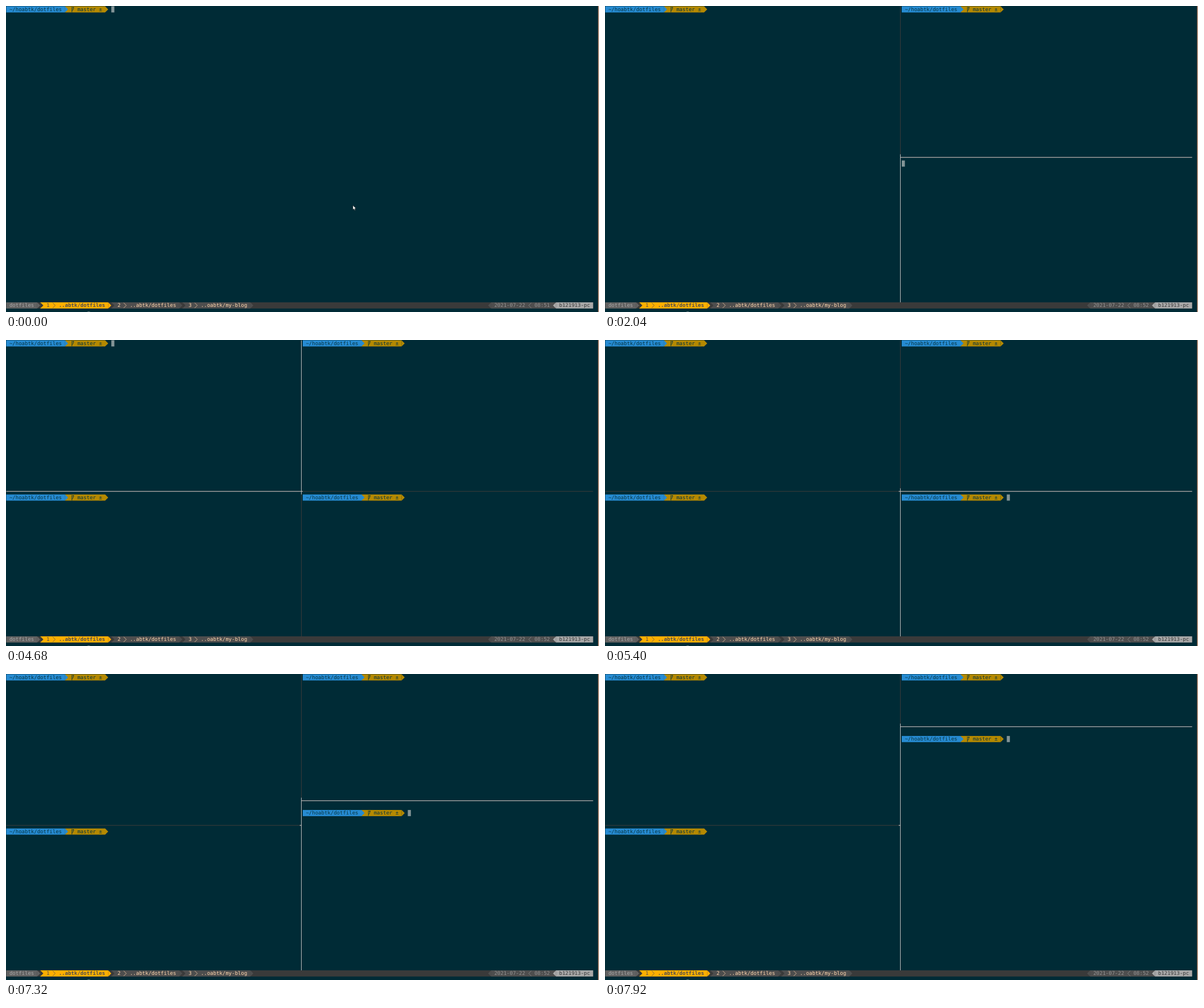
Animation, 1041 px wide and 538 px high, one loop 8000 ms. Source, as an HTML page:

```html
<!DOCTYPE html>
<html lang="en">
<head>
<meta charset="utf-8">
<title>Terminal panes</title>
<style>
  html, body { margin: 0; width: 100%; height: 100%; overflow: hidden; background: #002b36; }
  svg { display: block; width: 1041px; height: 538px; }
  text {
    font: 9px "DejaVu Sans Mono", monospace;
    white-space: pre;
    text-rendering: geometricPrecision;
  }
  .bold { font-weight: bold; }
</style>
</head>
<body>
<svg id="stage" viewBox="0 0 1041 538">
  <defs><clipPath id="near"><rect id="nearBox"/></clipPath></defs>
  <rect width="1041" height="538" fill="#002b36"/>
  <rect x="1039.5" width=".7" height="538" fill="#d9713f"/>
  <rect x="1040.2" width=".8" height="538" fill="#f8d9c8"/>
  <path d="M142.5 538.2q2.7-1.6 5.4 0" fill="none" stroke="#8a9696" stroke-width=".8"/>
  <g id="panes"></g>
  <g id="status"></g>
  <path id="mouse" d="M609 350.6v7.6l1.8-1.6 1.2 2.6 1.3-.6-1.2-2.5h2.3z"
        fill="#fff" stroke="#000" stroke-width=".5"/>
</svg>
<script>
const LOOP = 8000, COLS = 190, ROWS = 48, MID = 95, HALF = 24;
const CW = 1041 / 192, CH = 2 * CW;
const USER = "hoabtk";
const px = col => 0.5 + col * CW;
const py = row => 0.5 + row * CH;
const $ = id => document.getElementById(id);

function add(parent, tag, attrs) {
  const el = document.createElementNS("http://www.w3.org/2000/svg", tag);
  for (const key in attrs) el.setAttribute(key, attrs[key]);
  return parent.appendChild(el);
}

function fill(parent, col, row, cols, color) {
  add(parent, "rect", { x: px(col), y: py(row), width: cols * CW, height: CH, fill: color });
}

function write(parent, col, row, string, color, cls = "") {
  const el = add(parent, "text", { x: px(col), y: py(row) + 8.4, fill: color, class: cls });
  el.textContent = string;
  return el;
}

// Powerline separators: dir 1 points right, -1 points left.
function arrow(parent, col, row, color, dir = 1, thin = false) {
  const x = px(dir > 0 ? col : col + 1), y = py(row);
  const inset = thin ? 0.8 : 0;
  add(parent, "path", {
    d: `M${x} ${y + inset}l${dir * (CW - inset)} ${CH / 2 - inset}l${-dir * (CW - inset)} ${CH / 2 - inset}`,
    fill: thin ? "none" : color,
    stroke: thin ? color : "none",
    "stroke-width": 0.7
  });
}

function prompt(parent, col, row) {
  const ink = "#073642", blue = "#268bd2", gold = "#b58900";
  fill(parent, col + 19, row, 13, gold);
  fill(parent, col, row, 19, blue);
  arrow(parent, col + 19, row, blue);
  arrow(parent, col + 32, row, gold);
  write(parent, col + 1, row, `~/${USER}/dotfiles`, ink);
  write(parent, col + 23, row, "master ±", ink);
  add(parent, "path", {
    d: `M${px(col + 21) + 1.4} ${py(row) + 1}v9.4m0-2.6q2.4-1 2.4-3.4v-3m-1.2 1.6l1.2-1.6 1.2 1.6`,
    fill: "none", stroke: ink, "stroke-width": 0.9
  });
}

function drawStatus() {
  const g = $("status"), row = ROWS;
  const bar = "#3a3a3a", mid = "#4e4e4e", grey = "#626262", pale = "#a8a8a8", dim = "#949494";
  fill(g, 0, row, COLS, bar);

  fill(g, 0, row, 10, grey);
  write(g, 1, row, "dotfiles", pale);
  arrow(g, 10, row, grey);

  const tab = (col, index, name, back, ink, cls) => {
    fill(g, col, row, 22, back);
    arrow(g, col, row, bar);
    write(g, col + 2, row, index, ink);
    arrow(g, col + 4, row, ink, 1, true);
    write(g, col + 6, row, name, ink, cls);
    arrow(g, col + 22, row, back);
  };
  const dots = `..${USER.slice(-4)}/dotfiles`;
  tab(11, "1", dots, "#ffaf00", mid, "bold");
  tab(34, "2", dots, mid, "#ffd7af");
  tab(57, "3", `..${USER.slice(-5)}/my-blog`, mid, "#ffd7af");

  arrow(g, 156, row, mid, -1);
  fill(g, 157, row, 21, mid);
  write(g, 158, row, "2021-07-22", dim);
  arrow(g, 169, row, dim, -1, true);
  const clock = write(g, 171, row, "08:51", dim);
  arrow(g, 177, row, pale, -1);
  fill(g, 178, row, 12, pale);
  write(g, 179, row, "b121913-pc", bar);
  return clock;
}

// Panes open in the order A (left), B (right), C (lower right), D (lower left).
// Each step: time, open panes, active pane, prompts shown, right split row.
const steps = [
  [0, 1, "A", 1], [1200, 2, "B", 1], [1920, 2, "B", 2], [2040, 3, "C", 2],
  [2640, 3, "C", 3], [2760, 3, "A", 3], [3480, 4, "D", 3], [4200, 4, "D", 4],
  [4680, 4, "A", 4], [5040, 4, "B", 4], [5400, 4, "C", 4], [5760, 4, "D", 4],
  [6120, 4, "C", 4], [7320, 4, "C", 4, 20], [7560, 4, "C", 4, 16],
  [7800, 4, "C", 4, 12], [7920, 4, "C", 4, 8]
];

function borders(parent, open, split, color, clip) {
  const g = add(parent, "g", { fill: color });
  if (clip) g.setAttribute("clip-path", "url(#near)");
  const across = (from, to, row) =>
    add(g, "rect", { x: from, y: py(row) + 4.85, width: to - from, height: 1.1 });
  if (open > 1) add(g, "rect", { x: 518, y: py(0), width: 1, height: ROWS * CH });
  if (open > 2) across(518, px(COLS), split);
  if (open > 3) across(px(0), 518.5, HALF);
}

function drawPanes([, open, active, prompts, split = HALF]) {
  const g = $("panes");
  g.replaceChildren();

  const lower = split + (split < HALF ? 2 : 1);
  const origin = { A: [0, 0], B: [MID + 1, 0], C: [MID + 1, lower], D: [0, HALF + 1] };
  const right = active === "B" || active === "C";
  let top = active === "C" ? split : active === "D" ? HALF : 0;
  let end = ROWS;
  if (active === "A" && open > 3) end = HALF + 1;
  if (active === "B" && open > 2) end = split + 1;
  if (open === 2) top = HALF + 1; // with two panes only half of the border lights up

  const box = {
    x: right ? px(MID) : 0, y: py(top),
    width: right ? 530 : px(MID + 1), height: (end - top) * CH
  };
  for (const key in box) $("nearBox").setAttribute(key, box[key]);

  borders(g, open, split, "#3a3a3a", false);
  borders(g, open, split, "#bcbcbc", true);

  [..."ABCD"].slice(0, prompts).forEach(name => prompt(g, ...origin[name]));
  const [col, row] = origin[active];
  const ready = "ABCD".indexOf(active) < prompts;
  fill(g, col + (ready ? 34 : 0), row, 1, "#839496");
}

const clock = drawStatus();
const start = performance.now();
let shown = null;

function tick() {
  const t = (performance.now() - start) % LOOP;
  const step = steps.findLast(s => s[0] <= t);
  if (step !== shown) drawPanes(shown = step);
  const early = t < 720;
  $("mouse").style.visibility = early ? "visible" : "hidden";
  clock.textContent = early ? "08:51" : "08:52";
  requestAnimationFrame(tick);
}
tick();
</script>
</body>
</html>
```
